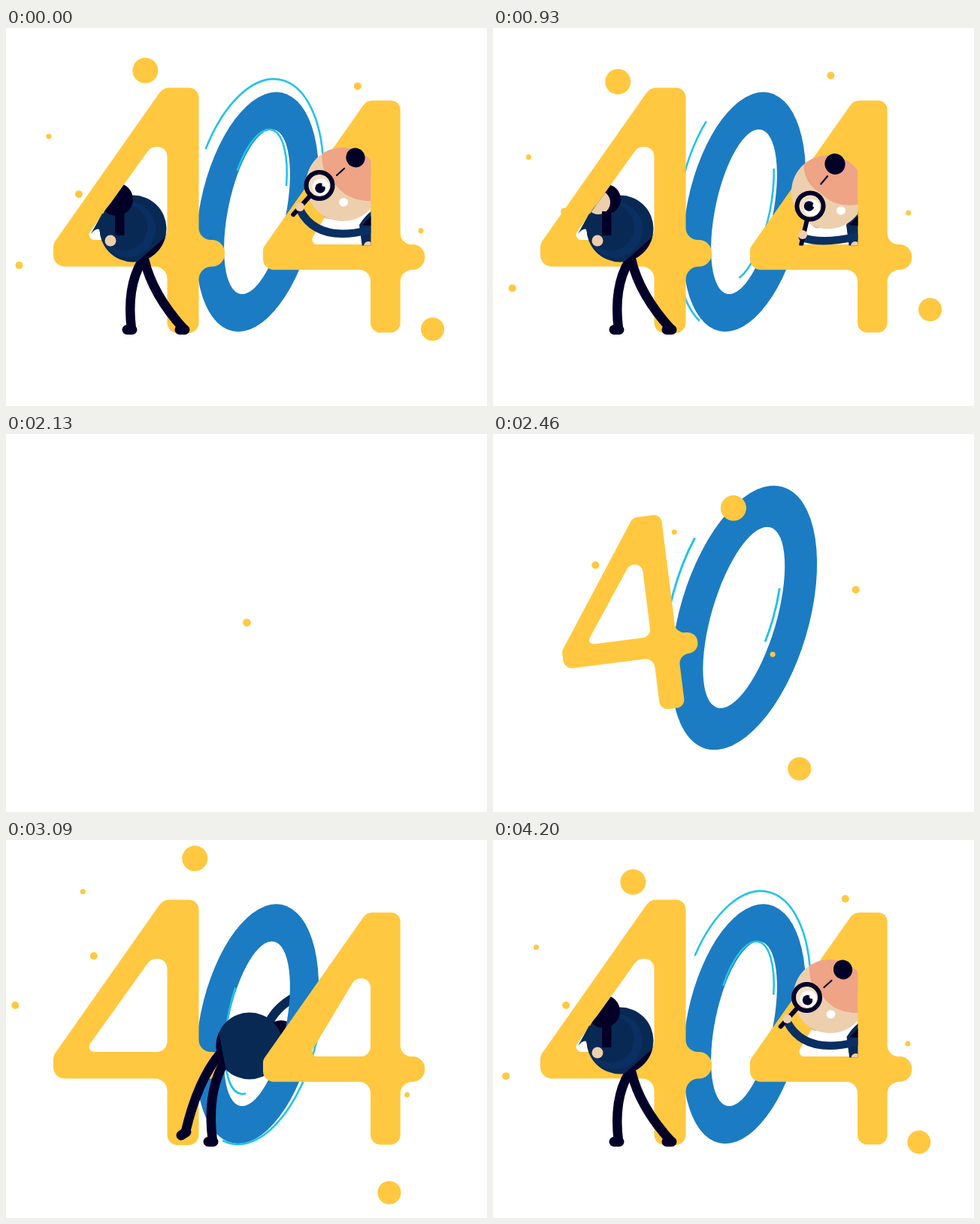
Recreate the animation shown at these times as an HTML page with a canvas. Size 640x503 px, loop 4.23 s.

```html
<!DOCTYPE html>
<html lang="en">
<head>
<meta charset="utf-8">
<title>404</title>
<style>
html, body { margin: 0; width: 100%; height: 100%; overflow: hidden; background: #fff; }
canvas { display: block; }
</style>
</head>
<body>
<canvas id="stage" width="640" height="503"></canvas>
<script>
const c = document.getElementById('stage').getContext('2d');
const LOOP = 4230, SHIFT = 2103;
const YELLOW = '#ffc840', BLUE = '#1b7cc3', CYAN = '#22c3ea', INK = '#030028',
  NAVY = '#092955', SLEEVE = '#0a2f62', SKIN = '#edcfae', PEACH = '#eea485';

// Easing helpers; "part" gives progress between two times
const clamp = x => Math.max(0, Math.min(1, x));
const part = (t, a, b) => clamp((t - a) / (b - a));
const outCubic = x => 1 - (1 - x) ** 3;
const smooth = x => x * x * (3 - 2 * x);
const back = x => 1 + 2.9 * (x - 1) ** 3 + 1.9 * (x - 1) ** 2;
const lerp = (a, b, k) => a + (b - a) * k;
const mix = (a, b, k) => a.map((v, i) => lerp(v, b[i], k));

// Drawing helpers
function oval(x, y, rx, ry, color, rot = 0) {
  c.beginPath();
  c.ellipse(x, y, rx, ry, rot, 0, 7);
  c.fillStyle = color;
  c.fill();
}
const dot = (x, y, r, color) => oval(x, y, r, r, color);

function line(d, width, color) {
  c.lineWidth = width;
  c.strokeStyle = color;
  c.lineCap = 'round';
  c.stroke(new Path2D(d));
}
function shape(d, color) {
  c.fillStyle = color;
  c.fill(new Path2D(d));
}
function group(x, y, scale, deg, draw) {
  c.save();
  c.translate(x, y);
  c.rotate(deg * Math.PI / 180);
  c.scale(scale, scale);
  c.translate(-x, -y);
  draw();
  c.restore();
}

// Polygon whose points are [x, y, corner radius]
function rounded(path, pts) {
  const last = pts[pts.length - 1], first = pts[0];
  path.moveTo((last[0] + first[0]) / 2, (last[1] + first[1]) / 2);
  pts.forEach((p, i) => {
    const n = pts[(i + 1) % pts.length];
    path.arcTo(p[0], p[1], n[0], n[1], p[2]);
  });
  path.closePath();
}
function four(holeX, holeY) {
  const p = new Path2D();
  rounded(p, [[256.5, 79.5, 13], [256.5, 282, 16], [291, 282, 17], [291, 317.5, 17],
    [256.5, 317.5, 17], [256.5, 406, 14], [214.5, 406, 14], [214.5, 317.5, 16],
    [63, 317.5, 15], [63, 287, 12], [209, 79.5, 16]]);
  rounded(p, [[214.5, holeY, 13], [214.5, 282, 14], [holeX, 282, 7], [193, holeY, 15]]);
  return p;
}
const leftFour = four(104, 158), rightFour = four(127, 172);

function drawFour(path, t, start, cx, cy, place) {
  const x = part(t, start, start + 590);
  if (!x) return;
  group(cx, cy, Math.max(0, back(x)), -12 * (1 - x) ** 2, () => {
    place();
    c.fillStyle = YELLOW;
    c.fill(path, 'evenodd');
  });
}

function sweep(rx, ry, rot, length, from, span) {
  if (span <= 0) return;
  c.beginPath();
  c.ellipse(332.5, 236.5, rx, ry, rot, 0, 2 * Math.PI);
  c.setLineDash([span * length, (1 - span) * length]);
  c.lineDashOffset = -(((from % 1) + 1) % 1) * length;
  c.lineCap = 'butt';
  c.lineWidth = 2.6;
  c.strokeStyle = CYAN;
  c.stroke();
  c.setLineDash([]);
}

function drawZero(t) {
  const x = part(t, 30, 570);
  if (!x) return;
  group(336, 245, Math.max(0, back(x)), 25 * (1 - x) ** 2, () => {
    c.beginPath();
    c.ellipse(334.3, 244.7, 76.5, 162, 0.204, 0, 7);
    c.closePath();
    c.moveTo(372, 252);
    c.ellipse(334, 244.5, 38.5, 111.6, 0.203, 0, 7);
    c.fillStyle = BLUE;
    c.fill('evenodd');
    const grow = outCubic(part(t, 200, 1000)), span = 0.338 * grow;
    const trail = -0.5645 + 0.00031 * t - 0.21 * (1 - grow), lead = trail + span;
    sweep(85.6, 170.8, 0.189, 828, -lead, span);
    sweep(36.6, 103.3, 0.198, 464.8, 0.5 + trail, span);
  });
}

// x, y, radius, delay: places as seen at t = 2100
const dots = [[185.5, 56.5, 17, 72], [567.5, 401, 15.5, 10], [468, 77.5, 5, 10],
  [57, 144, 3.5, 145], [97, 221, 5, 110], [552, 270, 3.5, 238], [17.5, 315.5, 5, 72]];
const turn = t => 53.3 * outCubic(part(t, 0, 4350));

function drawDots(t) {
  const a = (turn(2100) - turn(t)) * Math.PI / 180, cos = Math.cos(a), sin = Math.sin(a);
  const size = Math.min(1, 0.3 + t / 350);
  for (const [x, y, r, delay] of dots) {
    const k = outCubic(part(t, delay, delay + 900)), dx = (x - 320.5) * k, dy = (y - 251) * k;
    dot(320.5 + dx * cos - dy * sin, 251 + dx * sin + dy * cos, r * size, YELLOW);
  }
}

// Torso x, y, belt angle, then hip, knee and ankle of each leg
const climbing = [324, 274, 2.95, 285, 284, 255, 320, 239, 388, 288, 300, 267, 340, 275, 401];
const standing = [268, 288, 1.6, 247, 328, 202, 366, 236, 401, 266, 328, 216, 358, 275, 401];
const leaning = [169, 267, 0.85, 181, 310, 160, 345, 167, 401, 184, 308, 195, 355, 237, 401];

function drawLeg([hx, hy, kx, ky, fx, fy]) {
  line(`M${hx},${hy}Q${kx},${ky} ${fx},${fy}`, 12.5, INK);
  line(`M${fx - 6},${fy + 0.5 + (401 - fy) * 0.35}L${fx + 1},${fy + 0.5}`, 13, INK);
}

function drawBody(pose, inside) {
  const [x, y, belt] = pose;
  drawLeg(pose.slice(3, 9));
  drawLeg(pose.slice(9));
  dot(x, y, 44.5, NAVY);
  if (inside) {
    dot(x - 7, y + 1, 37, SLEEVE);
    dot(x - 12, y - 2, 31, NAVY);
  }
  c.beginPath();
  c.arc(x, y, 44.5, belt - 0.6, belt + 0.6);
  c.fillStyle = INK;
  c.fill();
}

function magnifier(x, y, r, width, tail, deg) {
  group(x, y, 1, deg, () => {
    line(`M${x},${y + r}V${y + tail}`, width, INK);
    c.beginPath();
    c.arc(x, y, r, 0, 7);
    c.lineWidth = width;
    c.stroke();
  });
}

function drawFront() {
  c.fillStyle = INK;
  c.fillRect(264, 268, 12, 24);
  line('M302,270C332,282 333,318 312,338', 15, SLEEVE);
  dot(308, 344.5, 7, SKIN);
  line('M234,298Q216,304 205,289', 14, SLEEVE);
  dot(239, 183, 19, INK);
  dot(315, 189, 18.5, INK);
  oval(224, 219, 12, 16, PEACH);
  oval(320, 225, 14.5, 16, PEACH);
  const head = 'M231,190C231,157 250,138 277,138C304,138 323,157 323,190L319,228C317,256 298,272 275,272C252,272 234,256 233,228Z';
  shape(head, SKIN);
  c.save();
  c.clip(new Path2D(head));
  shape('M304,144C270,165 266,235 292,268L330,270V144Z', PEACH);
  c.restore();
  oval(258, 186, 14, 10, '#fff');
  oval(297, 188.5, 14.5, 11, '#fff');
  dot(258.5, 185.5, 9, INK);
  dot(297, 188.5, 9, INK);
  dot(273.5, 203, 5.5, PEACH);
  dot(273, 239, 7, '#fff');
  dot(221, 230, 5, '#fff');
  magnifier(214, 237, 21.5, 8, 65, 15);
  dot(201.5, 284, 7.5, SKIN);
}

// 0 while peering up, 1 while peering down
const nod = t => smooth(part(t, 2300, 2850)) * (1 - smooth(part(t, 3350, 3950)));

function drawPeek(t) {
  const enter = outCubic(part(t, 1800, 2130));
  if (!enter) return;
  const w = nod(t);
  c.save();
  c.beginPath();
  c.rect(340, 120, 145.5, 169.5);
  c.clip();
  c.translate(110 * (1 - enter), 0);

  const [hx, hy] = mix([391, 238], [412, 275], w);
  const [lx, ly] = mix([417, 209.5], [422, 237], w);
  shape('M470,262Q480,246 492,240V292H474Z', NAVY);
  shape('M474,262L490,246V264Z', INK);
  line(`M${hx},${hy + 4}Q${lerp(414, 438, w)},${lerp(286, 288, w)} 482,${lerp(269, 278, w)}`, 10.5, SLEEVE);
  dot(482, 290, 6, SKIN);

  c.save();
  c.translate(-2 * w, 11 * w);
  group(443, 208, 1, -8 * w, () => {
    oval(430, 243, 11, 11, PEACH);
    oval(448, 208, 49, 49, SKIN);
    c.save();
    c.beginPath();
    c.ellipse(448, 208, 49, 49, 0, 0, 7);
    c.clip();
    shape('M424,150C416,178 422,196 438,208C448,222 466,234 500,229V180L480,150Z', PEACH);
    c.restore();
    line('M440,196L450,187', 2.2, INK);
  });
  c.restore();
  oval(lerp(465, 455, w), lerp(172.5, 181, w), 12.5 + w, 13 + w, INK, -0.5);
  oval(lerp(449, 463, w), lerp(232, 243, w), 6, 5.8, '#fff');

  dot(lx, ly, 16, '#f3dfc6');
  dot(lx + 2, ly + 2, 11, '#fff');
  dot(lerp(418, 420.5, w), lerp(213, 237, w), 6.8, INK);
  dot(lx + 6, ly - 1, 2.6, '#fff');
  magnifier(lx, ly, 17.5, 6, 52, lerp(42, 13, w));
  dot(hx, hy, 6, SKIN);
  c.restore();
}

// Head and hand of the figure leaning through the left four
function drawLean(t) {
  const w = nod(t);
  shape('M128,247L113,274Q120,266 124,268L128,284H140V250Z', NAVY);
  c.save();
  c.clip(new Path2D('M214,158H193L104,282H214Z'));
  dot(147 + 3 * w, 228, 22 - 2 * w, INK);
  dot(118 + 22 * w, 232, 16, SKIN);
  c.restore();
  c.fillStyle = INK;
  c.fillRect(145, 244, 12.5, 32);
  dot(139, 283, 7.5, SKIN);
}

function render(t) {
  c.clearRect(0, 0, 640, 503);
  const come = outCubic(part(t, 650, 930));
  const rise = smooth(part(t, 1000, 1280));
  const dive = smooth(part(t, 1620, 1900));
  const facing = outCubic(part(t, 1060, 1300));
  const inside = dive > 0.5;

  const pose = mix(mix(climbing, standing, rise), leaning, dive);
  pose[8] -= 12 * (Math.sin(Math.PI * rise) + Math.sin(Math.PI * dive));

  const man = () => {
    c.save();
    c.translate(85 * (1 - come), -10 * (1 - come));
    group(324, 274, 0.35 + 0.65 * come, 0, () => drawBody(pose, inside));
    c.restore();
  };

  // Parts reaching through the zero
  if (come && !facing) {
    c.save();
    c.translate(60 * (1 - come), 0);
    group(366, 262, 0.4 + 0.6 * come, 0, () => {
      line('M347,250Q356,224 386,208', 12, NAVY);
      dot(366, 261, 21, INK);
    });
    c.restore();
  }
  if (come && come < 0.7) man();

  drawZero(t);
  drawDots(t);
  drawFour(leftFour, t, 201, 177, 243, () => {});

  if (come >= 0.7) man();
  if (facing && !inside) {
    c.save();
    c.translate(pose[0] - 268, pose[1] - 288);
    group(268, 288, facing * (1 - 0.8 * dive), 0, drawFront);
    c.restore();
  }
  if (inside) drawLean(t);

  drawFour(rightFour, t, 380, 449.5, 251, () => {
    c.translate(342, 96.5);
    c.scale(0.944, 0.946);
    c.translate(-63, -79.5);
  });
  drawPeek(t);
}

const begin = performance.now();
function tick() {
  render((performance.now() - begin + SHIFT) % LOOP);
  requestAnimationFrame(tick);
}
tick();
</script>
</body>
</html>
```
